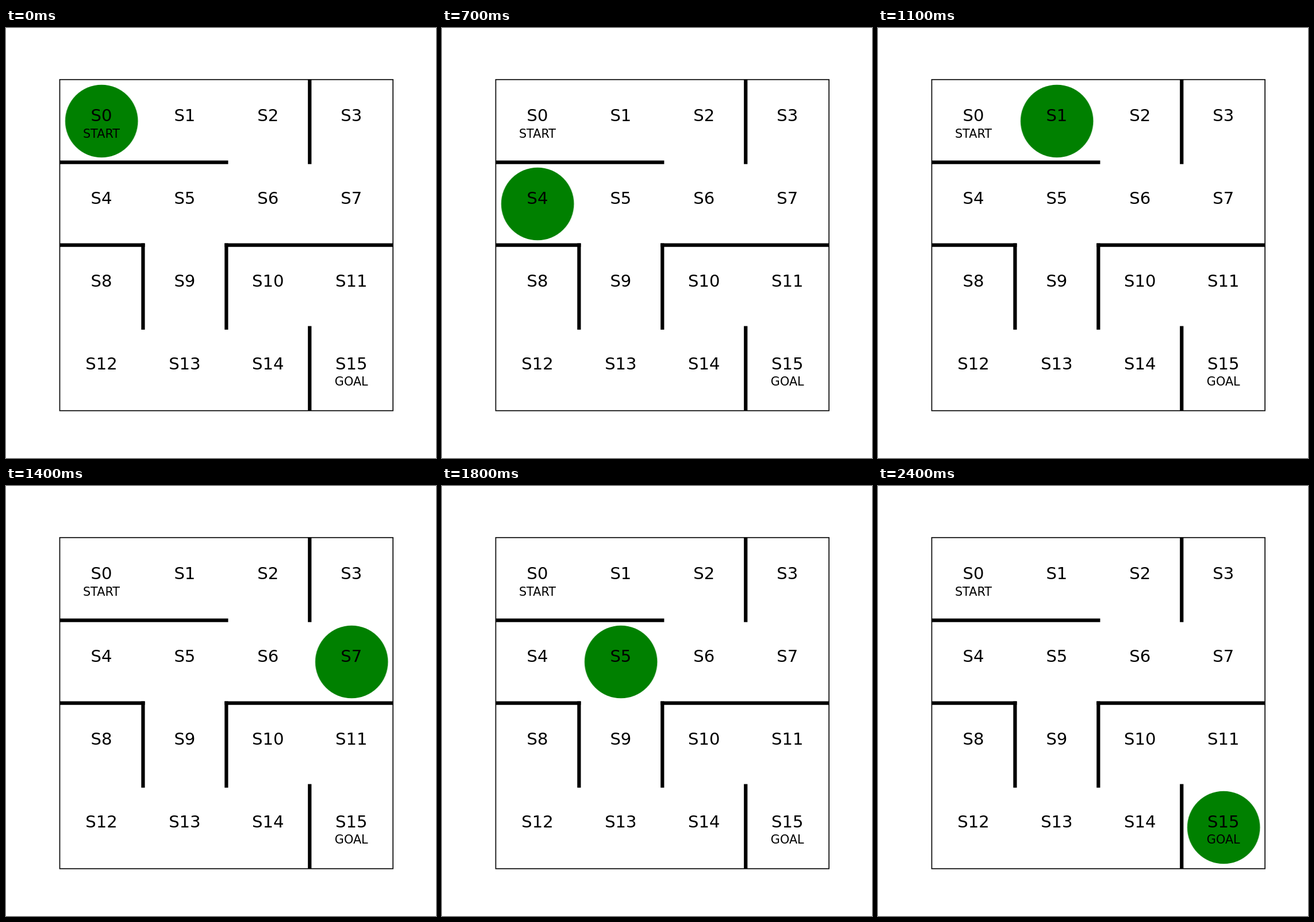
Recreate the animation shown at these times as an HTML page. Size 748x748 px, loop 2500 ms.

```html
<!DOCTYPE html>
<html lang="en">
<head>
<meta charset="utf-8">
<title>Maze walk</title>
<style>
  html, body { margin: 0; width: 100%; height: 100%; overflow: hidden; background: #fff; }
  svg { display: block; width: 748px; height: 748px; }
  text { font-family: "DejaVu Sans", Verdana, sans-serif; text-anchor: middle; fill: #000; }
  .state { font-size: 29.1px; }
  .note { font-size: 20.8px; }
  .wall { fill: none; stroke: #000; stroke-width: 6.23; stroke-linecap: square; }
  .frame { fill: none; stroke: #000; stroke-width: 1.66; }
</style>
</head>
<body>
<svg viewBox="0 0 748 748">
  <clipPath id="inside"><rect x="93.5" y="89.73" width="579.7" height="575.96"/></clipPath>
  <circle id="walker" r="63.3" fill="#008000"/>
  <g id="walls" clip-path="url(#inside)"></g>
  <rect class="frame" x="93.5" y="89.73" width="579.7" height="575.96"/>
  <g id="labels"></g>
</svg>
<script>
  const LEFT = 93.5, TOP = 89.73, CELL_W = 144.925, CELL_H = 143.99;
  const STEP_MS = 100;

  // Visited states, one per step.
  const path = [0, 1, 0, 1, 2, 6, 5, 4, 5, 6, 2, 1, 2, 6, 7, 3, 7, 6, 5, 9, 13, 14, 10, 11, 15];

  // Walls in grid units: x1, y1, x2, y2.
  const walls = [
    [0, 1, 2, 1], [3, 0, 3, 1], [0, 2, 1, 2], [1, 2, 1, 3],
    [2, 2, 4, 2], [2, 2, 2, 3], [3, 3, 3, 4]
  ];

  const gridX = col => LEFT + col * CELL_W;
  const gridY = row => TOP + row * CELL_H;
  const colOf = s => s % 4;
  const rowOf = s => Math.floor(s / 4);

  function add(parent, tag, attrs, content = "") {
    const el = document.createElementNS("http://www.w3.org/2000/svg", tag);
    for (const key in attrs) el.setAttribute(key, attrs[key]);
    el.textContent = content;
    document.getElementById(parent).append(el);
  }

  // Label with its baseline at a fraction of the cell height.
  function label(s, kind, depth, content) {
    const x = gridX(colOf(s) + 0.5);
    const y = Math.round(gridY(rowOf(s) + depth));
    add("labels", "text", { class: kind, x, y }, content);
  }

  for (const [x1, y1, x2, y2] of walls) {
    add("walls", "line", { class: "wall", x1: gridX(x1), y1: gridY(y1), x2: gridX(x2), y2: gridY(y2) });
  }

  for (let s = 0; s < 16; s++) label(s, "state", 0.5, "S" + s);
  label(0, "note", 0.7, "START");
  label(15, "note", 0.7, "GOAL");

  // Hold each cell, then jump to the next one.
  const frames = [...path, path[path.length - 1]].map((s, i) => {
    const x = Math.round(gridX(colOf(s) + 0.5)) + 0.25;
    const y = Math.round(gridY(rowOf(s) + 0.5));
    return { offset: i / path.length, transform: `translate(${x}px, ${y}px)`, easing: "steps(1, end)" };
  });
  document.getElementById("walker").animate(frames, {
    duration: path.length * STEP_MS,
    iterations: Infinity
  });
</script>
</body>
</html>
```
